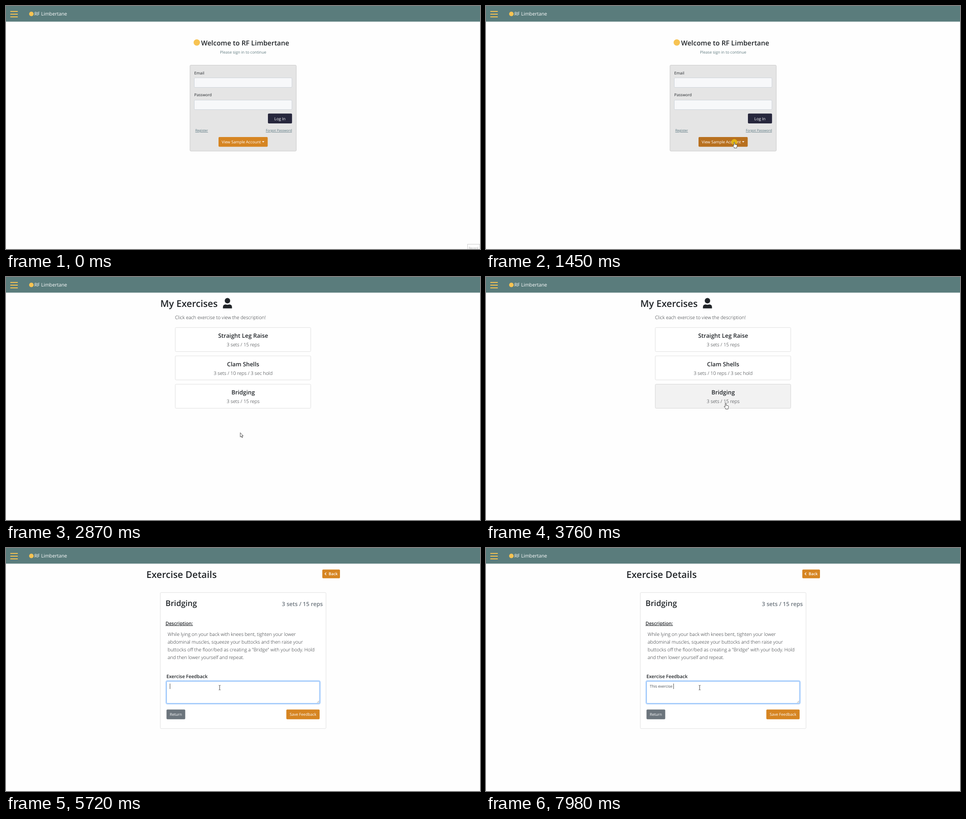
An HTML page for the animation above (8 s loop, 1046x536 px).

```html
<!DOCTYPE html>
<html lang="en">
<head>
<meta charset="utf-8">
<title>Exercise portal</title>
<style>
  html, body { margin: 0; width: 100%; height: 100%; overflow: hidden; background: #fefefe; }
  svg { display: block; }
  text { font: 8.6px "Open Sans", "Noto Sans", sans-serif; fill: #212529; white-space: pre; text-rendering: geometricPrecision; }
  .mid { text-anchor: middle; }
  .end { text-anchor: end; }
  .semi { font-weight: 600; }
  .h1 { font-size: 20.7px; font-weight: 600; }
  .h2 { font-size: 17.3px; font-weight: 600; }
  .h3 { font-size: 15px; font-weight: 600; }
  .h4 { font-size: 12.9px; font-weight: 600; }
  .label { font-size: 10.4px; font-weight: 600; }
  .light { font-size: 10.55px; font-weight: 300; fill: #212529; }
  .link { font-size: 7.43px; fill: #54727c; text-decoration: underline; }
  .white { fill: #fff; }
  .gold { fill: #f7c352; }
  .orange { fill: #d68522; }
  .field { fill: #f7f8fa; stroke: #ced4da; }
  .card { fill: #fff; stroke: #e0e0e0; }
</style>
</head>
<body>
<svg width="1046" height="536" viewBox="0 0 1046 536">
  <rect width="1046" height="34.5" fill="#5a7c7c"/>
  <path class="gold" d="M9.5 11h16.5v2h-16.5zM9.5 17h16.5v2h-16.5zM9.5 23h16.5v2h-16.5z"/>
  <circle class="gold" cx="56" cy="17.5" r="5"/>
  <text class="white" x="62.5" y="21.4" style="font-size:10.7px">RF Limbertane</text>

  <g id="record">
    <rect x="1018.5" y="525.5" width="27" height="14" fill="#fff" stroke="#ccc"/>
    <text x="1021" y="536" style="font-size:6.5px;fill:#aaa">Record</text>
  </g>

  <g id="login">
    <circle class="gold" cx="421" cy="80.5" r="7"/>
    <text class="h3" x="430.5" y="86.5">Welcome to RF Limbertane</text>
    <text class="mid" x="523.3" y="104.6" style="fill:#5f7a7f">Please sign in to continue</text>
    <rect x="406" y="130.5" width="234.5" height="189.5" rx="2" fill="#e5e5e5" stroke="#cacaca"/>
    <text x="415.5" y="150.5">Email</text>
    <rect class="field" x="415.5" y="158.5" width="215.5" height="21" rx="2"/>
    <text x="415.5" y="199.2">Password</text>
    <rect class="field" x="415.5" y="207.5" width="215.5" height="21" rx="2"/>
    <rect x="578" y="237.3" width="53.2" height="21.6" rx="2" fill="#27273d"/>
    <text class="mid white" x="604.5" y="251.6" style="font-size:8.8px">Log In</text>
    <text class="link" x="417.7" y="277.2">Register</text>
    <text class="link end" x="631" y="277.2">Forgot Password</text>
    <rect id="ring" x="468" y="288" width="110.5" height="23.5" rx="3" fill="none" stroke="#89acdf" stroke-width="2"/>
    <rect id="sample" class="orange" x="469" y="289" width="108.5" height="21.4" rx="2"/>
    <text class="white" x="476" y="303.2" style="font-size:8.72px">View Sample Account</text>
    <path class="white" d="M565 298.3h5.2l-2.6 2.6z"/>
    <g id="menu">
      <rect x="469.5" y="312" width="124" height="45.3" rx="2" fill="#fff" stroke="#d4d4d4"/>
      <rect id="row" x="470" width="123" height="18" fill="#e9ecef"/>
      <text x="478.4" y="329">Physical Therapist Account</text>
      <text x="478.4" y="347.2">Patient Account</text>
    </g>
  </g>

  <g id="list">
    <text class="h1" x="340.5" y="66.3">My Exercises</text>
    <circle cx="488.7" cy="52.2" r="6" fill="#212529"/>
    <path d="M478.7 69.3v-2.5q0-6.3 6-6.3q4 1.4 8 0q6 0 6 6.3v2.5z" fill="#212529"/>
    <text class="light" x="373" y="93.2">Click each exercise to view the description!</text>
    <rect class="card" x="373.5" y="111.5" width="299" height="53" rx="2"/>
    <text class="h4 mid" x="523.3" y="134">Straight Leg Raise</text>
    <text class="light mid" x="523.3" y="152.8">3 sets / 15 reps</text>
    <rect class="card" x="373.5" y="174" width="299" height="53" rx="2"/>
    <text class="h4 mid" x="523.3" y="196.7">Clam Shells</text>
    <text class="light mid" x="523.3" y="215.5">3 sets / 10 reps / 3 sec hold</text>
    <rect id="bridge" class="card" x="373.5" y="236.5" width="299" height="53" rx="2"/>
    <text class="h4 mid" x="523.3" y="259.3">Bridging</text>
    <text class="light mid" x="523.3" y="278">3 sets / 15 reps</text>
  </g>

  <g id="detail">
    <text class="h1" x="309.8" y="66.3">Exercise Details</text>
    <rect class="orange" x="698" y="47.5" width="39" height="19.2" rx="2"/>
    <path d="M706.6 54.3l-2.7 2.7l2.7 2.7" fill="none" stroke="#fff" stroke-width="1.3"/>
    <text class="semi white" x="712" y="60.2">Back</text>
    <rect class="card" x="340.5" y="98.3" width="365.7" height="300" rx="2"/>
    <text class="h2" x="352" y="128">Bridging</text>
    <text class="h4 end" x="699.2" y="128.3" style="font-size:12.6px;fill:#6c757d">3 sets / 15 reps</text>
    <text class="label" x="352" y="169.7" style="text-decoration:underline">Description:</text>
    <text class="light" x="356.8" y="193.7">While lying on your back with knees bent, tighten your lower</text>
    <text class="light" x="356.8" y="210.7">abdominal muscles, squeeze your buttocks and then raise your</text>
    <text class="light" x="356.8" y="227.7">buttocks off the floor/bed as creating a "Bridge" with your body. Hold</text>
    <text class="light" x="356.8" y="244.7">and then lower yourself and repeat.</text>
    <text class="label" x="354" y="287">Exercise Feedback</text>
    <rect id="glow" x="353.2" y="293" width="340" height="50.7" rx="3" fill="none" stroke="#b5d5fc" stroke-width="2.4"/>
    <rect id="area" x="354.5" y="294.3" width="337.4" height="48.2" rx="2" fill="#fff" stroke="#ced4da"/>
    <path d="M686.5 341.5l4.5-4.5M689 341.5l2-2" stroke="#777" stroke-width=".7"/>
    <text id="typed" x="361.5" y="308" style="font-size:8.42px;fill:#495057"></text>
    <rect id="caret" y="299" width=".9" height="12" fill="#333"/>
    <rect x="354.2" y="356.3" width="41.3" height="21.4" rx="2" fill="#6c757d"/>
    <text class="mid white" x="374.8" y="370.3" style="font-size:8.4px">Return</text>
    <rect class="orange" x="618.6" y="356.3" width="73.5" height="21.4" rx="2"/>
    <text class="mid white" x="655.4" y="370.3">Save Feedback</text>
  </g>

  <g id="mouse">
    <circle id="click" r="6.5" fill="#e6ba10" opacity=".9"/>
    <g stroke="#222" stroke-width=".8" stroke-linejoin="round" fill="#fff">
      <path id="arrow" d="M0 0V9.5L2.2 7.6L3.7 11L5.2 10.3L3.7 7H6.5Z"/>
      <path id="hand" d="M-1 1.2a1 1 0 0 1 2 0V5L5.2 5.9Q6.6 6.3 6.3 8.5L5.3 11.5V13.3H-.2V11.7L-3.5 8.2Q-3.6 6.3-1 7.8Z"/>
      <path id="beam" fill="none" d="M-2-5H-.5L0-4.5L.5-5H2M0-4.5V4.5M-2 5H-.5L0 4.5L.5 5H2"/>
    </g>
  </g>
</svg>
<script>
const LOOP = 8000, TICK = 70, LIST_AT = 2870, DETAIL_AT = 4710;
const ui = Object.fromEntries([...document.querySelectorAll('[id]')].map(e => [e.id, e]));
// Pointer legs: start, end, x, y
const legs = [
  [330, 1100, 553, 310], [1170, 1310, 548, 300], [1780, 2400, 517, 343.5],
  [3200, 3340, 520, 350], [3410, 3760, 529, 278], [3830, 4040, 529.5, 267],
  [4840, 5440, 471.5, 308]
];
const clicks = [[1380, 1520], [2810, LIST_AT], [4640, DETAIL_AT], [5580, 5720]];
const phrase = 'This exercise ';
const keys = [6320, 6520, 6600, 6680, 6770, 6850, 7110, 7310, 7380, 7580, 7680, 7780, 7880, 7980];

const show = (el, on) => el.style.display = on ? '' : 'none';

function pointerAt(t) {
  let x = 948, y = 527;
  for (const [start, end, toX, toY] of legs) {
    if (t < start) break;
    const steps = Math.floor((t - start) / TICK) + 1;
    const p = Math.min(1, steps * TICK / (end - start + TICK));
    const e = p * p * (3 - 2 * p);
    x += (toX - x) * e;
    y += (toY - y) * e;
  }
  return [x, y];
}

function draw(t) {
  const [x, y] = pointerAt(t);
  const login = t < LIST_AT, detail = t >= DETAIL_AT, list = !login && !detail;
  show(ui.record, t < 70);
  show(ui.login, login);
  show(ui.list, list);
  show(ui.detail, detail);

  const open = t >= 1520, onButton = login && t >= 1170 && y < 310.5;
  const onRow = login && open && y > 317, onCard = list && y < 290;
  ui.sample.style.fill = onButton ? '#b8701f' : '';
  show(ui.ring, open);
  show(ui.menu, open);
  show(ui.row, onRow);
  ui.row.setAttribute('y', y < 335 ? 317 : 335);
  ui.bridge.style.fill = onCard ? '#f2f2f2' : '';
  ui.bridge.style.stroke = onCard ? '#d6d6d6' : '';

  const focus = Math.max(0, Math.min(1, (t - 5580) / 140));
  ui.glow.style.opacity = focus;
  ui.area.style.stroke = focus ? '#8dbefa' : '';
  ui.typed.textContent = phrase.slice(0, keys.filter(k => k <= t).length);
  show(ui.caret, t >= 5650 && (t < 6120 || t >= 6320));
  if (detail) ui.caret.setAttribute('x', 361.5 + ui.typed.getComputedTextLength());

  const hand = onButton || onRow || onCard, beam = detail && y > 294;
  show(ui.mouse, t >= 330);
  ui.mouse.setAttribute('transform', `translate(${x} ${y})`);
  show(ui.click, clicks.some(([a, b]) => t >= a && t < b));
  show(ui.hand, hand);
  show(ui.beam, beam);
  show(ui.arrow, !hand && !beam);
}

const begin = performance.now();
function frame() {
  draw((performance.now() - begin) % LOOP);
  requestAnimationFrame(frame);
}
frame();
</script>
</body>
</html>
```
